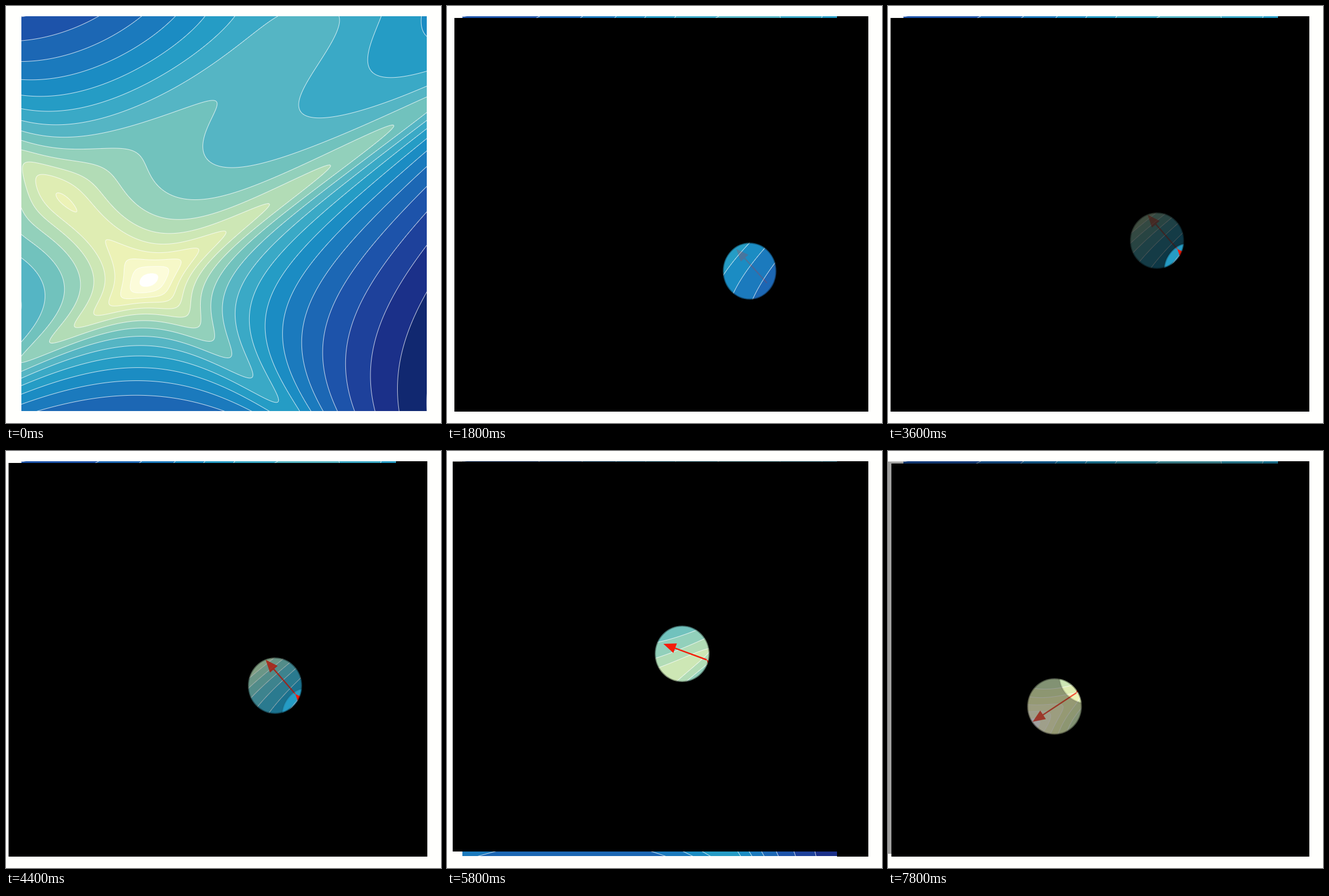
These frames come from a looping animation (764 by 733 pixels, 8000 ms). An HTML page with a canvas:

```html
<!DOCTYPE html>
<html lang="en">
<head>
<meta charset="utf-8">
<title>Gradient descent</title>
<style>
  html, body { margin: 0; width: 100%; height: 100%; overflow: hidden; background: #fffffd; }
  canvas { display: block; }
</style>
</head>
<body>
<canvas id="stage" width="764" height="733"></canvas>
<script>
const LOOP = 8000, STEP = 200;
const MAP = { x: 27, y: 18, w: 712, h: 694 };

// Fill colours from the valley floor up, one per doubling of the cost
const BANDS = [
  "fffffd", "fffffd", "fcfcda", "f6f8c8", "ecf2b6", "dfedb3", "cde7b5", "b2dcb6", "92d0bb", "71c2bd",
  "55b5c4", "3aa9c6", "259cc5", "1b8cc3", "1b7abd", "1c67b4", "1d53aa", "1e419b", "1b3089", "112870", "112870"
].map(hex => [0, 2, 4].map(i => parseInt(hex.slice(i, i + 2), 16)));

// One stop per arrow: start time, fade length, mask box, round opening, arrow ends
const STOPS = [
  { at: 1601, fade: 1000, box: [13, 21, 713], hole: [531.5, 466, 47, 50], from: [562, 487], to: [508, 427] },
  { at: 2840, fade: 2160, box: [4.5, 21, 713], hole: [472.5, 412.5, 47.5, 49.5], from: [508, 427], to: [456, 367] },
  { at: 4600, fade: 1070, box: [10, 18.5, 704], hole: [413, 356.5, 48, 49.5], from: [456, 367], to: [380, 339] },
  { at: 6060, fade: 930, box: [0, 18.5, 708], hole: [350, 394.5, 49.5, 49.5], from: [380, 339], to: [331, 425] },
  { at: 7200, fade: 950, box: [6, 22, 713], hole: [292.5, 449, 48, 49.5], from: [331, 425], to: [254, 476] }
];

const ctx = document.getElementById("stage").getContext("2d");
const clamp = v => Math.max(0, Math.min(1, v));

// Base-2 logarithm of the cost surface at a stage position
function height(px, py) {
  const x = (px - 5.5) / 245.3 - 1, y = 0.997 - (py - 18.5) / 232.1;
  const t = x + y + 1, u = 2 * x - 3 * y;
  const a = 1 + t * t * (19 - 14 * x + 9 * x * x - 14 * y + 3 * y * y);
  const b = 30 + u * u * (18 - 16 * u + 3 * u * u);
  return Math.log2(a * b);
}

function paintMap() {
  const cv = document.createElement("canvas");
  cv.width = MAP.w;
  cv.height = MAP.h;
  const c = cv.getContext("2d"), img = c.createImageData(MAP.w, MAP.h);
  let o = 0;
  for (let j = 0; j < MAP.h; j++) {
    for (let i = 0; i < MAP.w; i++) {
      const px = MAP.x + i + 0.5, py = MAP.y + j + 0.5, v = height(px, py);
      const slope = Math.hypot(height(px + 0.5, py) - height(px - 0.5, py),
                               height(px, py + 0.5) - height(px, py - 0.5));
      const dist = Math.abs(v - Math.round(v)) / (slope + 1e-6);
      const line = 0.75 * clamp(1 - dist);
      for (const ch of BANDS[Math.floor(v)]) img.data[o++] = ch + (255 - ch) * line;
      img.data[o++] = 255;
    }
  }
  c.putImageData(img, 0, 0);
  return cv;
}

function drawArrow({ from, to }, alpha) {
  const ang = Math.atan2(to[1] - from[1], to[0] - from[0]);
  const len = Math.hypot(to[0] - from[0], to[1] - from[1]);
  ctx.save();
  ctx.globalAlpha = alpha;
  ctx.translate(to[0], to[1]);
  ctx.rotate(ang);
  ctx.fillStyle = "#f51b0a";
  ctx.beginPath();
  ctx.moveTo(0, 0);
  ctx.lineTo(-22, -9);
  ctx.lineTo(-22, -1.2);
  ctx.lineTo(-len, -1.2);
  ctx.lineTo(-len, 1.2);
  ctx.lineTo(-22, 1.2);
  ctx.lineTo(-22, 9);
  ctx.fill();
  ctx.restore();
}

function drawMask({ box, hole }, alpha) {
  const [x, top, bottom] = box, [cx, cy, rx, ry] = hole;
  ctx.save();
  ctx.globalAlpha = alpha;
  ctx.fillStyle = "#000";
  ctx.beginPath();
  ctx.rect(x, top, 740 - x, bottom - top);
  ctx.ellipse(cx, cy, rx, ry, 0, 0, 2 * Math.PI);
  ctx.fill("evenodd");
  // soft rim
  ctx.strokeStyle = "rgba(0,0,0,.4)";
  ctx.lineWidth = 2.5;
  ctx.beginPath();
  ctx.ellipse(cx, cy, rx - 0.5, ry - 0.5, 0, 0, 2 * Math.PI);
  ctx.stroke();
  ctx.restore();
}

const map = paintMap();

function draw(time) {
  const t = Math.floor((time % LOOP) / STEP) * STEP;
  const n = STOPS.filter(s => t > s.at).length - 1;
  ctx.fillStyle = "#fffffd";
  ctx.fillRect(0, 0, 764, 733);
  ctx.drawImage(map, MAP.x, MAP.y);
  if (n < 0) return;
  const p = clamp((t - STOPS[n].at) / STOPS[n].fade);
  for (let i = 0; i < n; i++) drawArrow(STOPS[i], 1);
  drawArrow(STOPS[n], n ? Math.pow(p, 0.7) : p);
  if (n) drawMask(STOPS[n - 1], 1 - p);
  drawMask(STOPS[n], 1);
  ctx.fillStyle = "#000";
  ctx.fillRect(685, 18, 55, 695);
}

let start = null;
function tick(now) {
  if (start === null) start = now;
  draw(now - start);
  requestAnimationFrame(tick);
}
draw(0);
requestAnimationFrame(tick);
</script>
</body>
</html>
```
